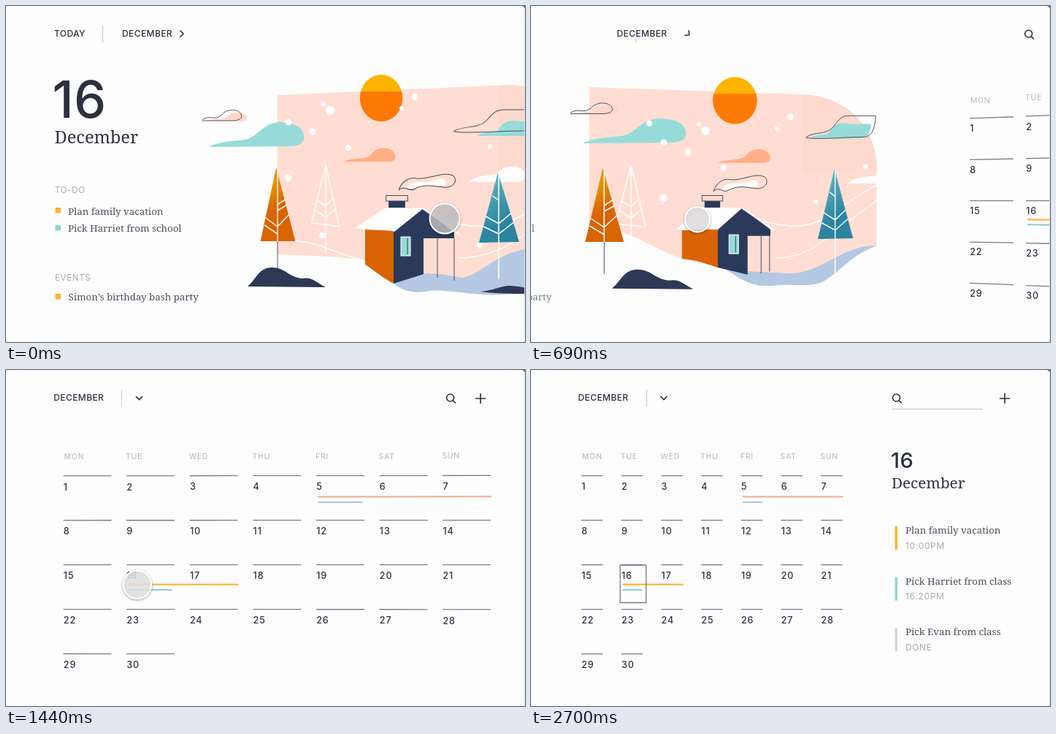
An HTML page for the animation above (2730 ms loop, 711 by 460 pixels).

```html
<!DOCTYPE html>
<html lang="en">
<head>
<meta charset="utf-8">
<title>Calendar</title>
<style>
html, body { margin: 0; width: 100%; height: 100%; overflow: hidden; background: #fdfdfd; }
svg { display: block; width: 711px; height: 460px; }
text { font-family: Inter, Arial, sans-serif; fill: #2d303d; }
.nav { font-size: 12px; font-weight: 500; letter-spacing: .4px; }
.day { font-weight: 500; letter-spacing: .5px; }
.serif { font-family: "Noto Serif", Georgia, serif; font-size: 13.3px; fill: #4a4e5a; }
.month { font-family: "Noto Serif", Georgia, serif; fill: #2f323f; }
.label { font-size: 11.5px; letter-spacing: .7px; fill: #a8a8ae; }
.week { font-size: 10.5px; letter-spacing: .7px; fill: #b6b6bb; }
.num { font-size: 12.5px; font-weight: 500; letter-spacing: .9px; }
.rule { stroke: #7b7d89; stroke-width: 1.3; }
.ink { fill: none; stroke: #2d303d; stroke-width: 1.6; }
.thin { fill: none; stroke: #4a4d5c; stroke-width: 1; }
.snow { fill: none; stroke: #fff; stroke-width: 1.5; }
#cursor { stroke: #fff; stroke-width: 2; filter: drop-shadow(0 1px 1.5px rgba(0, 0, 0, .4)); }
</style>
</head>
<body>
<svg viewBox="0 0 711 460">
  <defs>
    <linearGradient id="amber" x2=".3" y2="1">
      <stop offset=".3" stop-color="#e79200"/><stop offset=".65" stop-color="#d96400"/>
    </linearGradient>
    <linearGradient id="sea" x2=".4" y2="1">
      <stop offset=".25" stop-color="#5aaebd"/><stop offset=".8" stop-color="#2c849f"/>
    </linearGradient>
  </defs>
  <rect width="711" height="460" fill="#fdfdfd"/>

  <g id="scene">
    <path id="panel" fill="#ffddd3"/>
    <path id="band" fill="#fbd3c8" opacity=".45"/>
    <path id="drift" class="snow"/>
    <g id="waves" class="snow">
      <path d="M-22 -12C30 4 70 8 110 -15S160 -45 184 -55M20 45C70 45 100 20 130 0S165 -20 184 -35"/>
    </g>
    <g id="sun">
      <circle r="32" fill="#ffb400"/>
      <path d="M30.700 -9H-30.700A32 32 0 1 0 30.700 -9Z" fill="#ff7a05"/>
    </g>
    <path id="tealCloud" fill="#97dbd9" d="M0 0C22 -10 42 -7 58 -11C76 -16 82 -34 108 -34C132 -33 143 -25 143 -14C143 -4 135 -1 120 -1Z"/>
    <path id="peachCloud" fill="#ffae86" d="M0 0C15 -6 28 -2 40 -8C48 -20 66 -22 75 -14C81 -6 78 0 68 0Z"/>
    <path id="whiteCloud" fill="#fdfdfd" d="M0 0C8 -10 24 -8 38 -11C46 -24 66 -24 74 -16C78 -8 76 -2 66 0Z"/>
    <path id="farCloud" fill="#97dbd9" d="M0 0C15 -10 25 0 32 -12C38 -22 50 -22 60 -20H92C92 -8 85 0 75 0Z"/>
    <path id="lineCloud" class="thin" d="M0 0C14 -8 30 -2 42 -14C52 -26 56 -30 68 -29H107C106 -10 100 0 88 0C60 0 20 4 0 1Z"/>
    <g id="smallCloud">
      <path fill="#ffd6cb" d="M10 1C22 -4 32 2 40 -6C48 -12 66 -12 69 -4C70 0 64 2 56 2Z"/>
      <path class="thin" d="M0 0C10 -8 20 2 30 -7C38 -16 58 -16 61 -6C62 -1 55 1 45 1H0"/>
    </g>
    <g id="lineTree" class="snow">
      <path d="M0 -85L-21 -5L20 0ZM0 -85V36M-13 -36L0 -28L12 -40M-15 -22L0 -13L16 -26"/>
    </g>
    <g id="flakes" fill="#fff"></g>
    <path id="hill" fill="#b4c8e3"/>
    <path id="ridge" fill="#2d3954" d="M0 0C20 -2 30 -9 42 -8S66 -4 90 -3V2C60 4 20 3 0 0Z"/>
    <path id="wall" fill="#d96302"/>
    <path id="posts" class="thin"/>
    <path id="front" fill="#2b3a5b"/>
    <path id="roof" fill="#fff"/>
    <path id="eave" class="snow" style="stroke-width:2.5"/>
    <g id="glass">
      <rect width="13" height="26" fill="#97dbd9" stroke="#fff"/>
      <path d="M9 2V24" stroke="#2b3a5b"/>
    </g>
    <g id="chimney">
      <rect x="4" y="8" width="22" height="9" fill="#2b3a5b"/>
      <rect x=".5" y=".5" width="29" height="7.5" class="thin"/>
    </g>
    <g id="steam">
      <path fill="#fff" d="M11 -2C18 -14 28 -10 38 -11C50 -12 54 -18 62 -13C66 -7 58 -5 50 -6C34 -8 24 0 11 -2Z"/>
      <path class="thin" d="M0 0C4 -12 14 -18 24 -16C40 -14 58 -26 72 -20C80 -12 72 -2 58 -4C44 -6 34 -8 22 -2C14 4 8 -8 0 0Z"/>
    </g>
    <g id="seaTree">
      <path fill="url(#sea)" d="M-1 -96L-26 0L27 -1Z"/>
      <path class="snow" d="M0 -96V50M-17 -36L0 -26L16 -40M-20 -22L0 -12L20 -28M-8 -64L0 -58"/>
    </g>
    <g id="amberTree">
      <path fill="url(#amber)" d="M-2 -101L-26 0L27 0Z"/>
      <path class="thin" d="M0 0V44"/>
      <path class="snow" d="M0 -96V0M-18 -32L0 -20L17 -36M-20 -22L0 -10M0 -50L13 -58M0 -42L15 -50"/>
    </g>
    <path id="mound" fill="#2d3954" d="M0 0C12 -10 16 -26 34 -26C54 -26 58 -12 78 -11C90 -14 100 -4 110 1Z"/>
  </g>

  <g id="today"><text class="nav" x="66" y="42.3">TODAY</text></g>
  <g id="date">
    <text class="day" x="63.500" y="152.500" font-size="70">16</text>
    <text class="month" x="66.500" y="188" font-size="23.600">December</text>
  </g>
  <g id="lists">
    <text class="label" x="67" y="256">TO-DO</text>
    <rect x="67.500" y="276" width="7.500" height="7.500" fill="#fbb236"/>
    <text class="serif" x="85" y="285.500">Plan family vacation</text>
    <rect x="67.500" y="300" width="7.500" height="7.500" fill="#8bd4d1"/>
    <text class="serif" x="85" y="308.500">Pick Harriet from school</text>
    <text class="label" x="67" y="376">EVENTS</text>
    <rect x="67.500" y="394" width="7.500" height="7.500" fill="#fbb236"/>
    <text class="serif" x="85.500" y="402.500">Simon’s birthday bash party</text>
  </g>

  <path id="divider" d="M0 27V50" stroke="#c9c9ce"/>
  <g id="month"><text class="nav" y="42.3">DECEMBER</text></g>
  <path id="chevron" class="ink" d="M-2 -4.500L2.500 0L-2 4.500"/>
  <path id="plus" class="ink" d="M-7 39H7M0 32V46"/>
  <g id="search" class="ink"><circle cy="38" r="5"/><path d="M3.600 41.600L7.500 45.500"/></g>
  <path id="field" stroke="#c4c4c9"/>

  <g id="calendar"></g>
  <path id="box" fill="none" stroke="#777985" stroke-width="1.3" pathLength="1.25"/>

  <g id="dayHead">
    <text class="day" y="134.300" font-size="29">16</text>
    <text class="month" x="1" y="162" font-size="20.700">December</text>
  </g>
  <g id="agenda"></g>
  <circle id="ripple" fill="#fff"/>
  <circle id="cursor"/>
  <path d="M710.500 0V460" stroke="#e2e2e4"/>
  <path d="M707 0H711V3Z" fill="#777"/>
</svg>
<script>
const LOOP = 2730, STEP = 30;
const $ = id => document.getElementById(id);
const set = (el, attrs) => { for (const k in attrs) el.setAttribute(k, attrs[k]); };
const add = (parent, tag, attrs, text = '') => {
  const el = document.createElementNS('http://www.w3.org/2000/svg', tag);
  set(el, attrs);
  el.textContent = text;
  return $(parent).appendChild(el);
};

// Monotone cubic through (time, value) pairs, at rest on both ends.
function track(...keys) {
  const T = keys.filter((_, i) => i % 2 === 0), V = keys.filter((_, i) => i % 2);
  const rate = T.slice(1).map((t, i) => (V[i + 1] - V[i]) / (t - T[i]));
  const slope = T.map((_, i) => {
    const a = rate[i - 1], b = rate[i];
    return a * b > 0 ? 2 * a * b / (a + b) : 0;
  });
  return t => {
    if (t <= T[0]) return V[0];
    const i = T.findIndex(x => x > t) - 1;
    if (i < 0) return V[V.length - 1];
    const h = T[i + 1] - T[i], u = (t - T[i]) / h, w = 1 - u;
    return w * w * ((1 + 2 * u) * V[i] + u * h * slope[i])
         + u * u * ((3 - 2 * u) * V[i + 1] - w * h * slope[i + 1]);
  };
}

// A value following the swipe: rest, mid, late, gone.
const drag = (a, b, c, d = c, e = d) =>
  track(0, a, 200, a + (b - a) * .08, 510, b, 840, c, 1140, d, 1500, e);

const one = () => 1, zero = () => 0;
const layers = [
  ['waves', drag(600, 500, 125, -190), () => 300, drag(1, 1, .73)],
  ['sun', drag(514, 435, 108, -190), drag(126, 128, 130), drag(.91, 1, .9)],
  ['tealCloud', drag(278, 202, -80, -400), drag(193, 190, 187), drag(.91, 1, .98)],
  ['peachCloud', drag(463, 398, 92, -210), drag(213, 214, 215), drag(.9, 1, .87)],
  ['whiteCloud', drag(635, 593, 243, -90), drag(241, 243, 243), one],
  ['farCloud', drag(645, 555, 190, -150), drag(178, 177, 185), drag(1, 1, .85)],
  ['lineCloud', drag(614, 541, 201, -65, -180), drag(171, 176, 182, 186), drag(1.05, 1, .82)],
  ['smallCloud', drag(269, 191, -100, -400), drag(156, 150, 145), drag(.88, 1, .9)],
  ['lineTree', drag(438, 323, -60, -400), drag(302, 303, 303), drag(.93, 1, 1)],
  ['ridge', drag(650, 600, 220), () => 391, drag(1, 0, 0)],
  ['seaTree', drag(675, 589, 228, -90), drag(324, 321, 318), drag(1.04, 1, .85)],
  ['amberTree', drag(372, 278, -90, -400), drag(322, 323, 323), drag(.9, 1, 1)],
  ['mound', drag(331, 256, -55, -380), drag(384, 385, 388), drag(.97, 1, 1.02)],
  ['glass', drag(541, 446, 81, -250), drag(316, 315, 312), one],
  ['chimney', drag(520, 416, 42, -270), () => 259, drag(1.03, 1, .95)],
  ['steam', drag(538, 433, 58, -250), drag(252, 253, 254), drag(1.03, 1, .96)],
  ['flakes', drag(66, 0, -311, -720), drag(-14, 0, 21), one],
  ['today', drag(0, -76, -270), zero, one],
  ['date', drag(0, -95.5, -330), zero, one],
  ['lists', drag(0, -80, -330), zero, one]
];

// Paths whose points slide between three poses, then leave to the left.
const shapes = [
  ['panel',
    'M372 122L690 108C760 108 805 160 805 232L805 340C700 380 620 385 531 379L491 348C450 342 410 342 372 340Z',
    'M249 119L570 115C640 115 684 165 684 230L684 337C630 338 560 384 455 366L388 349C340 335 320 296 249 296Z',
    'M-95 106L165 124C220 127 260 165 260 215L260 322C225 350 190 383 108 364L16 344C-10 336 -50 318 -95 300Z'],
  ['band',
    'M674 109C760 106 805 160 805 232L674 235Z',
    'M570 115C640 115 684 165 684 230L570 235Z',
    'M165 124C220 127 260 165 260 215L165 225Z'],
  ['drift',
    'M372 322C420 316 450 340 490 348',
    'M249 296C320 296 340 335 388 350',
    'M-95 300C-50 318 -10 336 16 344'],
  ['hill',
    'M531 380C560 360 590 366 625 372C660 366 680 320 760 334C760 380 720 395 680 395C640 398 600 385 575 391C555 394 540 388 531 380Z',
    'M440 362C470 366 500 374 535 372C590 368 605 305 675 336C640 332 620 358 590 378C565 392 540 374 515 380C480 394 465 386 440 362Z',
    'M80 360C100 362 130 356 160 362C190 364 225 345 260 322C245 340 220 365 205 374C190 384 165 384 140 384L124 384C115 380 105 374 80 360Z'.replace('384L124 384C', '384C')],
  ['wall',
    'M492 306L531 308L531 380C515 372 505 362 492 354Z',
    'M388 306L434 308L434 361C420 352 405 350 388 349Z',
    'M16 305L66 305L66 357C50 354 35 346 16 345Z'],
  ['front',
    'M531 308L571 277L614 310L614 318L572 318L572 367L531 380Z',
    'M434 308L470 277L512 308L512 316L474 316L474 366L434 361Z',
    'M66 305L98 276L134 305L134 314L108 314L108 369L66 357Z'],
  ['posts',
    'M591 318L591 372M614 318L614 376',
    'M493 316L493 372M511 316L511 370',
    'M126 314L126 362M133 314L133 360'],
  ['roof',
    'M478 304L519 277L572 277L532 309C518 304 505 308 478 304Z',
    'M379 306L417 276L470 277L434 308C415 302 400 312 379 306Z',
    'M9 305L42 275L98 276L66 305C48 300 35 310 9 305Z'],
  ['eave', 'M571 277L622 313', 'M470 277L519 308', 'M98 276L137 306']
].map(([id, ...poses]) => {
  const num = /-?[\d.]+/g, ops = poses[0].split(num);
  const [a, b, c] = poses.map(d => d.match(num).map(Number));
  const points = a.map((v, i) => drag(v, b[i], c[i], c[i] - (i % 2 ? 0 : 310)));
  return t => set($(id), { d: ops.map((op, i) => op + (points[i] ? points[i](t).toFixed(2) : '')).join('') });
});

[[378, 157, 6], [301, 147, 4], [369, 148, 3], [321, 173, 4.5], [494, 138, 4.5], [476, 154, 3],
 [403, 208, 4], [320, 249, 5], [367, 328, 4], [597, 206, 3], [680, 254, 4], [529, 254, 3],
 [583, 341, 4], [354, 186, 4.5]]
  .forEach(([cx, cy, r]) => add('flakes', 'circle', { cx, cy, r }));

const week = ['MON', 'TUE', 'WED', 'THU', 'FRI', 'SAT', 'SUN']
  .map(name => add('calendar', 'text', { class: 'week' }, name));
const days = Array.from({ length: 30 }, (_, i) => ({
  col: i % 7, row: Math.floor(i / 7),
  rule: add('calendar', 'path', { class: 'rule' }),
  num: add('calendar', 'text', { class: 'num' }, i + 1)
}));
// first column, last column, share of the last cell, height, colour, weight
const bars = [
  [4, 6, 1, 173.5, '#f5ab92', 2], [4, 4, .95, 181, '#bcb8f2', 2],
  [1, 2, 1, 293.7, '#fbb63c', 2.2], [1, 1, .93, 301, '#87cfcd', 2]
].map(([from, to, part, y, stroke, width]) => ({
  from, to, part, y, el: add('calendar', 'path', { stroke, 'stroke-width': width })
}));

[['Plan family vacation', '10:00PM', '#fbb236'],
 ['Pick Harriet from class', '16:20PM', '#8bd9d2'],
 ['Pick Evan from class', 'DONE', '#d5d5d9']].forEach(([title, note, fill], i) => {
  const y = 69.6 * i;
  add('agenda', 'rect', { x: -14.5, y: 214 + y, width: 3.5, height: 32, fill });
  add('agenda', 'text', { class: 'serif', y: 224 + y }, title);
  add('agenda', 'text', { class: 'label', y: 244.5 + y, style: 'font-size:12px;letter-spacing:.6px' }, note);
});

const swipe = track(0, 0, 200, .012, 510, .16, 840, .69, 1140, .947, 1620, 1);
const open = track(1620, 0, 1770, .27, 2160, .963, 2700, 1);
const left = track(0, 790, 510, 745, 840, 427, 1140, 130, 1620, 70);
const gap = track(840, 83.5, 1140, 86.6);
const cell = track(840, 60, 1140, 63.5, 1620, 66.5);
const tilt = track(510, 1.6, 840, 1, 1140, .17, 1620, 0);
const pointer = {
  x: track(0, 601, 510, 340, 840, 171, 1140, 160, 1620, 189),
  y: track(0, 291, 840, 292.5, 1620, 294),
  r: track(0, 20.5, 300, 17.2, 840, 17.2, 1140, 19.5, 1620, 19, 1770, 5),
  tone: track(0, 204, 510, 236, 1140, 240),
  alpha: track(1620, 1, 1770, .25, 1830, 0)
};
const ripple = {
  r: track(1620, 18, 1770, 40, 1890, 48),
  alpha: track(1590, 0, 1680, .75, 1770, .6, 1890, 0)
};

const shift = (id, x, y = 0, more = '') => set($(id), { transform: `translate(${x} ${y}) ${more}` });

function drawCalendar(t, p) {
  const x0 = left(t), step = gap(t) - 31.9 * p, w = cell(t) - 37 * p, lean = tilt(t);
  const X = i => x0 + i * step - 5.5 * lean * Math.sin(Math.min(i, 3) * Math.PI / 3);
  const Y = (y, i) => 266.7 + (y - 266.7) * (1 - lean * (.056 - .019 * i));
  week.forEach((el, i) => set(el, { x: X(i) - (i ? 2 : 0), y: Y(121.7, i) }));
  for (const { col, row, rule, num } of days) {
    const x = X(col), y = 144.7 + 61 * row;
    set(rule, { d: `M${x - 1} ${Y(y, col)}L${x - 1 + w} ${Y(y, col + .7)}` });
    set(num, { x: x - .8, y: Y(y + 19.7, col) });
  }
  for (const { from, to, part, y, el } of bars) {
    set(el, { d: `M${X(from) + 1} ${Y(y, from)}L${X(to) + w * part} ${Y(y, to + .7)}` });
  }
  const a = X(1) - 2.5, b = X(1) + w + 3.5;
  set($('box'), {
    d: `M${a} 267V318.500H${b}V267M${a} 267H${b}`,
    'stroke-dasharray': `${p} 2`, opacity: p > 0 ? 1 : 0
  });
}

function draw(t) {
  const s = swipe(t), p = open(t);
  for (const [id, x, y, sx] of layers) shift(id, x(t), y(t), `scale(${sx(t)} 1)`);
  shapes.forEach(shape => shape(t));
  $('scene').style.display = t > 1500 ? 'none' : '';
  set($('lists'), { opacity: 1 - Math.min(s, .3) * .9 });

  shift('divider', 132.5 + 26 * s);
  shift('month', 159 - 94.5 * s);
  shift('chevron', 240.5 - 58.5 * s, 38, `rotate(${90 * s})`);
  const plus = 649 + 132 * (1 - s), icon = plus - 41.5 - 107 * p;
  shift('plus', plus);
  shift('search', icon);
  set($('field'), { d: `M${icon - 6.5} 53.500h${124.5 * p}` });

  drawCalendar(t, p);
  shift('dayHead', 493 + 275 * (1 - p));
  shift('agenda', 513 + 400 * (1 - p));

  const cx = pointer.x(t), cy = pointer.y(t), tone = Math.round(pointer.tone(t));
  set($('cursor'), { cx, cy, r: pointer.r(t), fill: `rgba(${tone},${tone},${tone},.78)`, opacity: pointer.alpha(t) });
  set($('ripple'), { cx, cy, r: ripple.r(t), opacity: ripple.alpha(t) });
}

const start = performance.now();
function tick() {
  const t = (performance.now() - start) % LOOP;
  draw(Math.floor(t / STEP) * STEP);
  requestAnimationFrame(tick);
}
tick();
</script>
</body>
</html>
```
